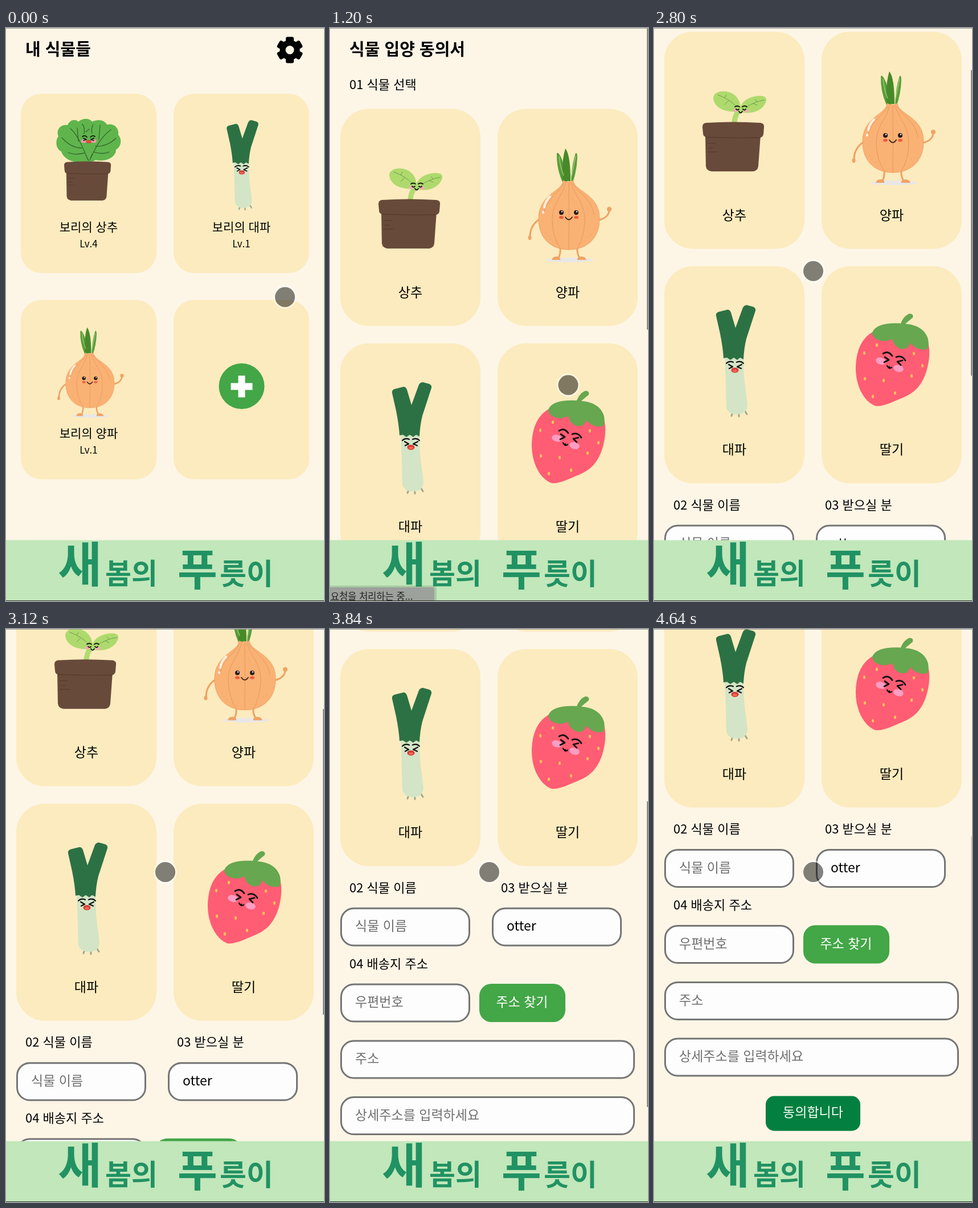
These frames come from a looping animation (558x1003 px, 4.72 s). An HTML page:

```html
<!DOCTYPE html>
<html lang="ko">
<head>
<meta charset="utf-8">
<title>식물 입양</title>
<style>
html, body { margin: 0; width: 100%; height: 100%; overflow: hidden; background: #fdf6e7; }
svg { display: block; width: 100%; height: 100%; font-family: "Noto Sans CJK KR", "Noto Sans CJK", "Noto Sans", sans-serif; }
.card { fill: #fcebbe; }
.small .card { width: 238px; height: 314px; rx: 36px; }
.large .card { width: 246px; height: 380px; rx: 50px; }
.title { font-size: 29px; font-weight: 700; }
.name { font-size: 21px; font-weight: 500; text-anchor: middle; }
.level { font-size: 17px; text-anchor: middle; }
.kind { font-size: 23px; font-weight: 500; text-anchor: middle; }
.step { font-size: 22px; }
.field { fill: #fdfdfd; stroke: #757575; stroke-width: 3px; width: 225px; height: 65px; rx: 22px; }
.wide { width: 514px; }
.value { font-size: 23px; }
.hint { font-size: 23px; fill: #6f6f6f; }
.button { font-size: 23px; fill: #fff; text-anchor: middle; }
.brand { font-weight: 900; fill: #219263; }
.line { fill: none; stroke-linecap: round; stroke-linejoin: round; }
.ink { stroke: #111; }
</style>
</head>
<body>
<svg viewBox="0 0 558 1003" preserveAspectRatio="none">
<defs>
  <g id="pot">
    <path fill="#684a3a" d="M90 322H187L183 377Q182 385 174 386L101 386Q92 385 91 377Z"/>
    <path fill="#684a3a" d="M91 301Q138 298 187 301Q194 302 193 309L192 321Q191 327 184 327L93 326Q86 326 86 319L85 308Q85 302 91 301Z"/>
    <path class="line" stroke="#523628" d="M91 326Q140 328 186 327M94 337h14M95 345h9M94 352h17"/>
  </g>

  <g id="sprout">
    <path class="line" stroke="#b0db72" stroke-width="9" d="M151 278Q143 284 141 299"/>
    <path fill="#aeda6d" d="M152 281C127 284 106 276 104 258C104 246 121 243 134 248C147 253 153 266 152 281Z"/>
    <path fill="#aeda6d" d="M150 281C151 264 165 256 181 254C191 253 198 255 197 262C194 277 173 289 150 281Z"/>
    <path class="line" stroke="#6f9c4c" d="M112 252Q134 260 146 274M124 257l3 -5M131 262l-7 7M194 261Q176 264 161 274M181 264l-4 -4M174 267l7 3"/>
    <g fill="#f5a9b4"><ellipse cx="143" cy="279" rx="4" ry="3"/><ellipse cx="162" cy="280" rx="4" ry="3"/></g>
    <path class="line ink" stroke-width="1.8" d="M142 273q4 -3 8 0M155 273q4 -3 8 0M144 277q3 3 5 0M156 277q3 3 5 0M149 281q3 5 6 0"/>
    <use href="#pot"/>
  </g>

  <g id="lettuce">
    <path fill="#5fb54c" d="M133 234C120 237 101 230 97 216C86 211 87 195 92 190C87 177 97 168 108 170C112 160 122 159 127 164C135 157 147 158 151 164C161 159 173 161 177 169C190 166 199 176 197 187C205 196 201 209 193 213C193 227 174 235 157 231Q151 236 145 235Z"/>
    <path class="line" stroke="#35662f" stroke-width="1.3" d="M144 231C136 213 127 188 113 176M127 198L125 175M133 210Q114 210 98 192M137 219Q121 223 109 218M148 229C156 212 165 192 184 178M163 195L165 170M157 207Q177 208 193 193M153 217Q170 222 181 217M137 185Q139 175 134 168M151 184Q149 175 153 169M140 182l6 -5M145 232l-6 -12M147 231l4 -10"/>
    <g fill="#f5a0ac"><ellipse cx="136" cy="198" rx="4.5" ry="3"/><ellipse cx="154" cy="198" rx="4.5" ry="3"/></g>
    <path class="line ink" stroke-width="1.7" d="M134 190q5 -3 8 1M148 191q4 -4 8 -1M136 193l5 2l-5 2M154 193l-5 2l5 2"/>
    <ellipse cx="145" cy="199" rx="4.5" ry="3" fill="#e4473e"/>
    <use href="#pot" transform="matrix(.76 0 0 .79 37.4 -3)"/>
  </g>

  <g id="onion">
    <ellipse cx="421" cy="406" rx="42" ry="4" fill="#e9e7e6"/>
    <path class="line" stroke="#eda163" stroke-width="3" d="M367 335Q351 346 351 365M472 336Q489 332 490 319M404 384Q405 395 401 402M434 384Q433 395 438 402"/>
    <g fill="#f0a365">
      <ellipse cx="350.500" cy="367" rx="3" ry="4"/><circle cx="490" cy="317" r="4"/>
      <path d="M389 406Q391 399 399 400Q405 401 404 406ZM434 406Q433 400 441 400Q448 400 450 406Z"/>
    </g>
    <path fill="#5a9e3a" d="M408 270Q397 245 398 219Q401 216 407 230Q413 248 416 270ZM423 270Q424 240 431 219Q434 217 434 227Q433 250 426 270Z"/>
    <path fill="#478a29" d="M408 268Q406 233 413 211Q422 222 422 268Z"/>
    <path class="line" stroke="#a5cd83" stroke-width="1.300" d="M402 225Q404 244 410 258M431 225Q427 244 424 258"/>
    <path fill="#fab174" stroke="#eea366" d="M409 267C409 286 366 290 366 334C366 371 391 388 419 388C448 388 473 371 473 333C473 290 428 286 427 267Q418 272 409 267Z"/>
    <path class="line" stroke="#e59a5b" d="M413 271C408 297 390 304 390 338Q391 366 404 386M419 271Q420 330 419 387M423 271C430 297 447 304 447 338Q446 366 434 386M410 272C401 290 379 300 376 322M426 272C438 290 459 300 463 326M382 364l1 1M379 358l1 1M387 369l1 1M451 365l1 1M457 361l1 1M425 298l1 1M428 303l1 1"/>
    <path class="line" stroke="#fff0df" stroke-width="4" d="M376 314Q378 303 386 295M374 322v1"/>
    <g fill="#f05a3c"><ellipse cx="406" cy="331.500" rx="4" ry="2.500"/><ellipse cx="432" cy="331.500" rx="4" ry="2.500"/></g>
    <g fill="#241a16"><circle cx="406" cy="323" r="4"/><circle cx="432" cy="323" r="4"/></g>
    <g fill="#fff"><circle cx="407" cy="321.500" r="1.200"/><circle cx="433" cy="321.500" r="1.200"/></g>
    <path class="line" stroke="#3b241a" stroke-width="1.800" d="M413 331Q419 340 425 331"/>
  </g>

  <g id="leek">
    <path class="line" stroke="#9caa93" stroke-width="3" d="M138 808l-2 6M149 809v6M160 806l3 5"/>
    <path fill="#d3e5c6" d="M124 710H157Q157 745 161 770L164 795Q163 809 150 811Q132 813 127 800Q126 780 126 755Z"/>
    <path fill="#2c7144" d="M109 639Q108 634 113 632L129 628Q133 628 135 633L143 660L155 627Q157 620 163 620L174 623Q179 625 178 630L162 679Q158 695 157 715L151 712L146 716L140 712L134 716L128 712L122 713Q121 695 116 670Z"/>
    <path class="line ink" stroke-width="2.200" d="M127 722Q132 717 139 720M145 720Q152 717 157 722M131 724L138 728L132 731M154 724L146 728L153 731"/>
    <ellipse cx="142" cy="734" rx="6.500" ry="4.500" fill="#d93a34"/><ellipse cx="142" cy="735" rx="4" ry="2" fill="#f16a5e"/>
  </g>

  <g id="strawberry">
    <path fill="#ff5d73" d="M386 666C360 679 354 708 354 733C355 764 369 788 387 796C398 800 420 789 437 782C461 772 471 757 478 736C484 716 485 697 480 682Z"/>
    <path fill="#66a750" d="M433 652Q438 639 448 635Q456 635 454 642Q444 650 441 653C462 654 477 664 481 680Q483 693 479 697Q463 701 449 686Q447 700 431 696Q420 691 418 679Q408 685 397 682Q383 678 383 668Q390 650 433 652Z"/>
    <path class="line" stroke="#f8c25c" stroke-width="4" d="M391 689v2M369 703v2M456 704v2M471 725v2M370 748v2M403 751v2M452 743v2M423 773v2M384 779v2"/>
    <g fill="#fd9dc3"><ellipse cx="398" cy="718" rx="9" ry="6" transform="rotate(15 398 718)"/><ellipse cx="429" cy="731" rx="9" ry="6" transform="rotate(15 429 731)"/></g>
    <path class="line ink" stroke-width="2.800" d="M402 705Q411 699 418 709M425 711Q435 707 441 717M405 711L412 716L404 720M436 717L427 719L433 725"/>
    <path class="line ink" stroke-width="2.200" d="M409 726q1 4 4 2q2 4 4 1M412 730q1 1 2 0"/>
  </g>
</defs>

<rect width="558" height="1003" fill="#fdf6e7"/>

<g id="home" class="small">
  <text class="title" x="34" y="48">내 식물들</text>
  <g transform="translate(498 38.500)">
    <circle r="17.500"/>
    <g id="teeth"><rect id="tooth" x="-7" y="-23" width="14" height="46" rx="3"/><use href="#tooth" transform="rotate(60)"/><use href="#tooth" transform="rotate(120)"/></g>
    <circle r="7.500" fill="#fdf6e7"/>
  </g>
  <rect class="card" x="26" y="115"/><rect class="card" x="294" y="115"/>
  <rect class="card" x="26" y="476"/><rect class="card" x="294" y="476"/>
  <use href="#lettuce"/>
  <use href="#leek" transform="translate(299.800 -336.500) scale(.803)"/>
  <use href="#onion" transform="translate(-186.500 356) scale(.796)"/>
  <text class="name" x="145" y="355.500">보리의 상추</text><text class="level" x="145" y="384">Lv.4</text>
  <text class="name" x="413" y="355.500">보리의 대파</text><text class="level" x="413" y="384">Lv.1</text>
  <text class="name" x="145" y="716.500">보리의 양파</text><text class="level" x="145" y="745">Lv.1</text>
  <circle cx="413.500" cy="627" r="40" fill="#43a647"/>
  <path stroke="#fff" stroke-width="12" d="M394.500 627.500h38M413.500 608.500v38"/>
</g>

<g id="form" class="large">
  <text class="title" x="34" y="48">식물 입양 동의서</text>
  <text class="step" x="34" y="107">01 식물 선택</text>
  <rect class="card" x="18" y="141.500"/><rect class="card" x="294" y="141.500"/>
  <rect class="card" x="18" y="552"/><rect class="card" x="294" y="552"/>
  <use href="#sprout"/><use href="#onion"/><use href="#leek"/><use href="#strawberry"/>
  <text class="kind" x="141" y="470.500">상추</text><text class="kind" x="417" y="470.500">양파</text>
  <text class="kind" x="141" y="881">대파</text><text class="kind" x="417" y="881">딸기</text>

  <text class="step" x="34" y="977.500">02 식물 이름</text><text class="step" x="300" y="977.500">03 받으실 분</text>
  <rect class="field" x="19.500" y="1006"/><text class="hint" x="44" y="1045">식물 이름</text>
  <rect class="field" x="285.500" y="1006"/><text class="value" x="310" y="1045">otter</text>

  <text class="step" x="34" y="1110.500">04 배송지 주소</text>
  <rect class="field" x="19.500" y="1139"/><text class="hint" x="44" y="1178">우편번호</text>
  <rect x="262" y="1138" width="151" height="67" rx="21" fill="#43a647"/><text class="button" x="337" y="1178">주소 찾기</text>
  <rect class="field wide" x="19.500" y="1238"/><text class="hint" x="44" y="1277">주소</text>
  <rect class="field wide" x="19.500" y="1336.500"/><text class="hint" x="44" y="1375.500">상세주소를 입력하세요</text>
  <rect x="196" y="1437" width="166" height="61" rx="15" fill="#037f3f"/><text class="button" x="279" y="1473.500">동의합니다</text>
</g>

<rect id="thumb" x="556" width="2" height="535" fill="#8b8983"/>

<rect y="896.500" width="558" height="107" fill="#c1e7ba"/>
<g class="brand">
  <text x="91" y="970" font-size="84">새</text><text x="174" y="973" font-size="50">봄의</text>
  <text x="301" y="976" font-size="76">푸</text><text x="375" y="974" font-size="51">릇이</text>
</g>

<g id="status">
  <path fill="#000" opacity=".12" d="M0 976H180Q187 976 187 983V1003H0Z"/>
  <path fill="#9da19c" d="M0 979H178Q183 979 183 984V1003H0Z"/>
  <text x="1" y="1001" font-size="16.500" fill="#222">요청을 처리하는 중...</text>
</g>

<g id="pointer">
  <circle r="19" fill="none" stroke="#fff" stroke-width="3" opacity=".5"/>
  <circle r="17.500" opacity=".49"/>
</g>
<path stroke="#a19d95" d="M0 .5H558"/>
<path stroke="#2c332b" d="M0 1002.500H558"/>
</svg>

<script>
const LOOP = 4720, STEP = 80;
const PAGE_CHANGE = 880, STATUS_FROM = 1040, STATUS_TO = 1440;
const scrollKeys = [[1920, 0], [2160, 13.5], [2800, 135], [3440, 375.5], [3840, 517], [4400, 619.5]];
const pointerX = [[80, 489.5], [640, 418], [1280, 418], [1840, 279.5]];
const pointerY = [[80, 471], [640, 625], [1280, 625], [1840, 425.5]];
const thumbFade = [[4400, 1], [4720, .2]];
const el = id => document.getElementById(id);
const [home, form, thumb, statusBox, pointer] = ['home', 'form', 'thumb', 'status', 'pointer'].map(el);

// Monotone cubic curve through [time, value] keys, held flat at both ends.
function curve(keys, t) {
  const last = keys.length - 1;
  if (t <= keys[0][0]) return keys[0][1];
  if (t >= keys[last][0]) return keys[last][1];
  const slope = i => (keys[i + 1][1] - keys[i][1]) / (keys[i + 1][0] - keys[i][0]);
  const tangent = i => {
    if (i === 0 || i === last) return 0;
    const a = slope(i - 1), b = slope(i);
    return a * b > 0 ? 2 * a * b / (a + b) : 0;
  };
  const i = keys.findIndex(k => k[0] > t) - 1;
  const [t0, v0] = keys[i], [t1, v1] = keys[i + 1];
  const span = t1 - t0, u = (t - t0) / span, w = 1 - u;
  return v0 * w * w * (1 + 2 * u) + v1 * u * u * (3 - 2 * u)
    + span * u * w * (tangent(i) * w - tangent(i + 1) * u);
}

const show = (node, on) => node.style.display = on ? '' : 'none';
const move = (node, x, y) => node.setAttribute('transform', `translate(${x} ${y})`);

function draw(t) {
  const scroll = curve(scrollKeys, t), onForm = t >= PAGE_CHANGE;
  show(home, !onForm);
  show(form, onForm);
  show(thumb, onForm);
  show(statusBox, t >= STATUS_FROM && t < STATUS_TO);
  move(form, 0, -scroll);
  move(thumb, 0, scroll * .597 - 7);
  thumb.style.opacity = curve(thumbFade, t);
  move(pointer, curve(pointerX, t), curve(pointerY, t));
}

const start = performance.now();
function tick() {
  const t = (performance.now() - start) % LOOP;
  draw(Math.floor(t / STEP) * STEP);
  requestAnimationFrame(tick);
}
tick();
</script>
</body>
</html>
```
